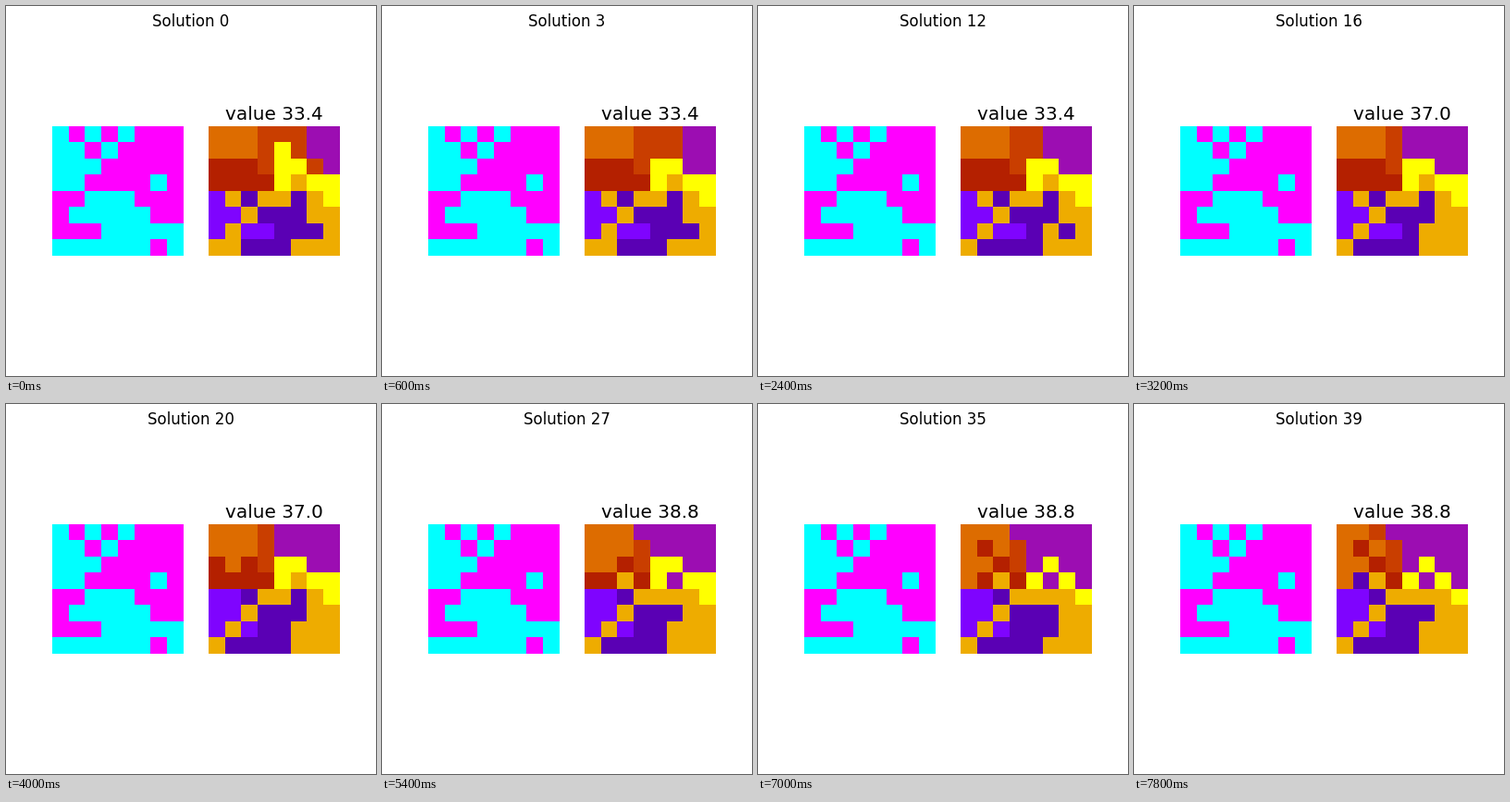
Animation, 400 px wide and 400 px high, one loop 8000 ms. Source, as a matplotlib script:

```python
import matplotlib.pyplot as plt
import numpy as np
from matplotlib.animation import FuncAnimation

SIZE, DPI = 400, 100
FRAMES, INTERVAL = 40, 200
CELLS, GRID_W, GRID_H, GRID_Y = 8, 142, 140, 130

# Blocks are named by their corner cells: column letter, row counted from the top
VOTERS = {1: "f0h4 e1e3 d2d3 c3 c1 b0 d0 a4a6 b4 b6c6 g5h5 g7", 0: "g3"}
DISTRICTS = {
    1: "c4 f4f6 d5e5 e6e7 g6 c7d7",
    2: "a4a6 b5 c6d6",
    3: "g0h1 h2",
    4: "a2c3 d3",
    5: "d0f1 d2 g2",
    6: "a0c1",
    8: "e1e3 f2 g3h3 h4",
}

# Each move: a cell joins the district of its neighbour in the given direction
MOVES = ("e1W g2E f1E f0E b7E f6S g6S e1E e0E b4W b2N d6E a2N "
         "d0E f4E f3NE c3SE a3N h3N b1SE f6W e2N b3SE f6E c0SE").split()
PACE = ([0, 5, 6, 12, 17, 19, 25], [0, 6, 12, 20, 26, 30, 38])


def cell(name):
    return int(name[1]), ord(name[0]) - ord("a")


def paint(blocks, background):
    grid = np.full((CELLS, CELLS), background)
    for number, names in blocks.items():
        for name in names.split():
            (top, left), (bottom, right) = cell(name[:2]), cell(name[-2:])
            grid[top:bottom + 1, left:right + 1] = number
    return grid


def plan_at(n):
    grid = paint(DISTRICTS, background=7)
    for k, move in enumerate(MOVES, 1):
        if np.interp(k, *PACE) > n:
            break
        row, col = cell(move)
        way = move[2:]
        grid[row, col] = grid[row + ("S" in way) - ("N" in way),
                              col + ("E" in way) - ("W" in way)]
    return grid


def value(n):
    return 33.4 if n < 16 else 37.0 if n < 24 else 38.8


def enlarge(grid):
    """Nearest-neighbour scaling, sampled at pixel centres."""
    rows = ((np.arange(GRID_H) + 0.5) * CELLS / GRID_H).astype(int)
    cols = ((np.arange(GRID_W) + 0.5) * CELLS / GRID_W).astype(int)
    return grid[np.ix_(rows, cols)]


def show_grid(x, grid, cmap, vmax):
    return fig.figimage(enlarge(grid), xo=x, yo=GRID_Y, cmap=cmap,
                        vmin=0, vmax=vmax, origin="upper")


plt.rcParams["font.family"] = "DejaVu Sans"
fig = plt.figure(figsize=(SIZE / DPI, SIZE / DPI), dpi=DPI, facecolor="white")
show_grid(50, paint(VOTERS, background=0), "cool", 1)
plan = show_grid(219, plan_at(0), "gnuplot", 8)
heading = fig.suptitle("", fontsize=12, y=0.98)
label = fig.text(289.55 / SIZE, 277.4 / SIZE, "", fontsize=14.4,
                 ha="center", va="baseline")


def update(n):
    plan.set_data(enlarge(plan_at(n)))
    heading.set_text(f"Solution {n}")
    label.set_text(f"value {value(n):.1f}")
    return plan, heading, label


anim = FuncAnimation(fig, update, frames=FRAMES, interval=INTERVAL,
                     init_func=lambda: update(0), repeat=True, repeat_delay=0)
plt.show()
```
